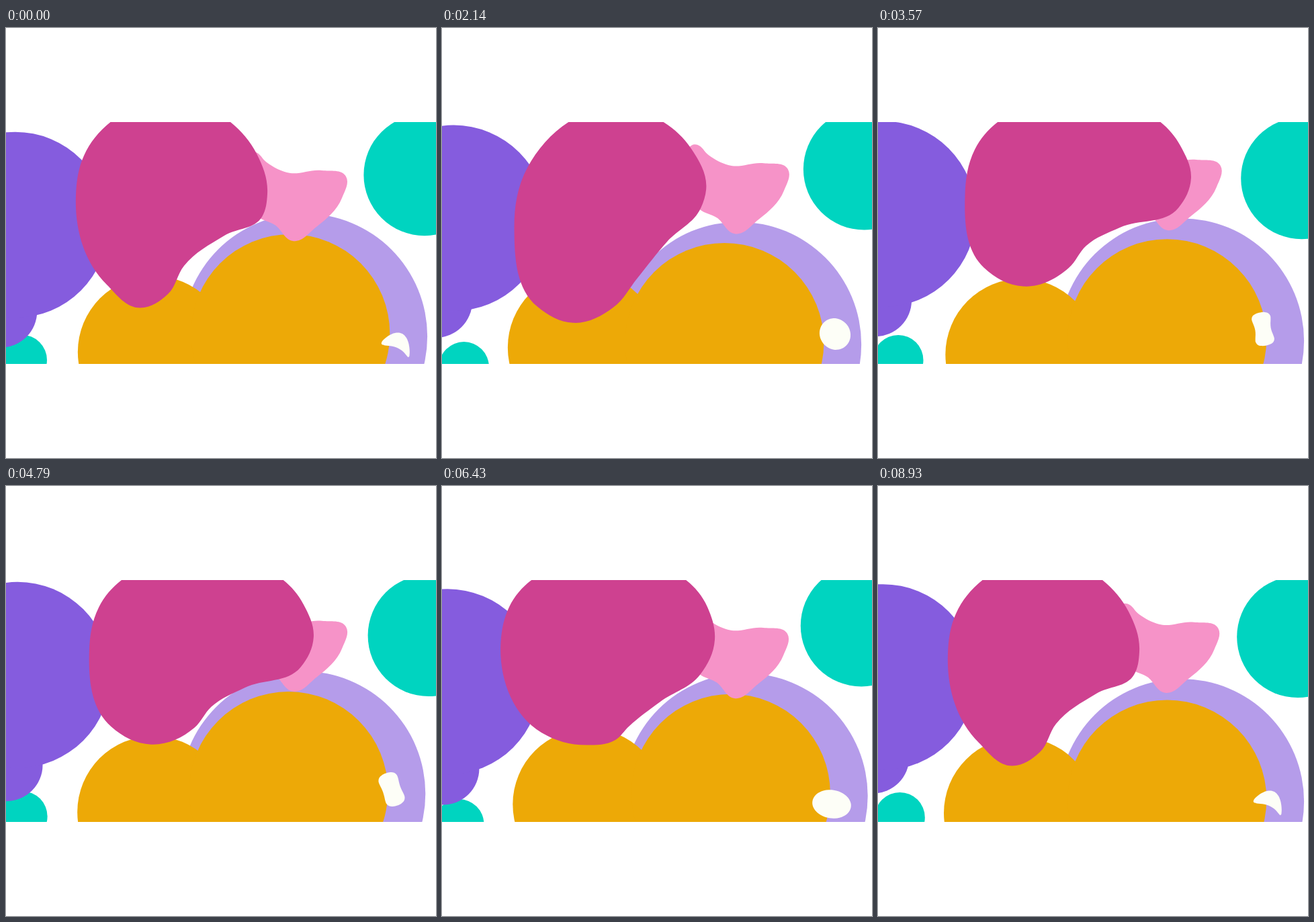
Recreate the animation shown at these times as an HTML page with a canvas. Size 640 by 640 pixels, loop 9000 ms.

```html
<!DOCTYPE html>
<html lang="en">
<head>
<meta charset="utf-8">
<title>Drifting blobs</title>
<style>
  html, body { margin: 0; height: 100%; overflow: hidden; background: #fff; }
  canvas { display: block; width: 100vmin; height: 100vmin; }
</style>
</head>
<body>
<canvas id="stage" width="640" height="640"></canvas>
<script>
const ctx = document.getElementById('stage').getContext('2d');
const LOOP = 9, FPS = 14;
const TEAL = '#00d4c0', PURPLE = '#855cde', VIOLET = '#b59cea', YELLOW = '#eda907';
const PINK = '#f693c8', MAGENTA = '#ce4190', CREAM = '#fdfef7';

// Swings around a middle value; period and the moment of the peak are in seconds.
const wave = (middle, swing, period, peak) =>
  t => middle + swing * Math.cos(2 * Math.PI * (t - peak) / period);

const dots = [
  { color: TEAL, r: 37.3, x: wave(28, 5, 6, 2.5), y: wave(498, 7, 5.2, 7) },
  { color: PURPLE, r: 54, x: wave(-4, 6, 9, 5.8), y: wave(412.5, 9, 6, 0) },
  { color: PURPLE, r: 138.3, x: wave(12.3, 5, 2.7, 4.85), y: wave(285, 8, 7, 7.1) },
  { color: TEAL, r: 90.5, x: wave(626.7, 4, 8, 3.6), y: wave(216.5, 9, 5.2, 4.1) },
  { color: VIOLET, r: 182.5, x: wave(446.6, 5, 2.7, 3.55), y: wave(464, 7, 6, 2.3) },
  { color: YELLOW, r: 113, x: wave(215.5, 5, 6, 5.5), y: wave(480.5, 7, 5.2, 4.1) },
  { color: YELLOW, r: 148, x: wave(425.3, 5, 2.7, 3.55), y: wave(460.5, 7.5, 6, 2.3) }
];

const fish = {
  x: wave(4.5, 4.5, 4.6, 2.3),
  y: wave(-5, 8, 7, 7),
  outline: [[371, 181.5], [388, 197], [418, 212], [470, 209], [506, 218], [500, 250],
    [462, 293], [427, 314], [400, 290], [375, 278], [350, 230]]
};

// Blob outlines run clockwise from the top and share their corner order.
const rest = {
  blob: [[245, 108], [373, 187], [389, 247], [381, 281], [325, 309], [265, 354],
    [241, 396], [200, 416.5], [150, 382], [104, 250], [116, 190]],
  spot: { x: 583, y: 472, rx: 23, ry: 11, angle: 0.5, bend: 14, waist: 0, taper: 0.3 }
};
const tall = {
  blob: [[255, 119], [371, 180], [393, 240], [385, 268], [335, 318], [291, 372],
    [255, 416], [195, 439], [142, 415], [107.5, 300], [127, 208]],
  spot: { x: 585, y: 455.5, rx: 24, ry: 22.5, angle: 0.9, bend: 0, waist: 0, taper: 0 }
};
const wide = {
  blob: [[292, 103], [450, 175], [466, 224], [447, 268], [360, 297], [310, 324],
    [284, 357], [216, 384.5], [158, 357], [129.5, 250], [144, 181]],
  spot: { x: 573, y: 448, rx: 25, ry: 28, angle: 1.4, bend: 0, waist: 0.58, taper: 0 }
};
const squat = {
  blob: [[240, 106], [395, 180], [406, 229], [384, 281], [325, 321], [278, 358],
    [258, 378], [215, 385.5], [148, 367], [87.5, 232], [100, 180]],
  spot: { x: 580, y: 473.5, rx: 29, ry: 21, angle: 0.15, bend: 0, waist: 0, taper: 0 }
};
const morph = [
  { at: 0, pose: rest }, { at: 2.1, pose: tall }, { at: 3.6, pose: wide },
  { at: 4.3, pose: wide }, { at: 6.4, pose: squat }, { at: 7.8, pose: rest }, { at: LOOP, pose: rest }
];

// Blends numbers, and arrays or objects of numbers, part by part.
function mix(a, b, u) {
  if (typeof a === 'number') return a + (b - a) * u;
  if (Array.isArray(a)) return a.map((v, i) => mix(v, b[i], u));
  return Object.fromEntries(Object.keys(a).map(k => [k, mix(a[k], b[k], u)]));
}

function poseAt(t) {
  const next = morph.findIndex(key => key.at > t);
  const from = morph[next - 1], to = morph[next];
  const u = (t - from.at) / (to.at - from.at);
  return mix(from.pose, to.pose, u * u * (3 - 2 * u));
}

// An ellipse that can be bent, pinched at the waist, tapered to one end and turned.
function spotOutline({ x, y, rx, ry, angle, bend, waist, taper }) {
  const cos = Math.cos(angle), sin = Math.sin(angle);
  return Array.from({ length: 24 }, (_, i) => {
    const c = Math.cos(i * Math.PI / 12), s = Math.sin(i * Math.PI / 12);
    const px = rx * c;
    const py = ry * s * (1 - waist * s * s) * (1 - taper * c) + bend * (c * c - 0.5);
    return [x + px * cos - py * sin, y + px * sin + py * cos];
  });
}

// Closed curve; each tangent follows the circle through a point and its neighbours.
function fillSmooth(color, points) {
  const n = points.length;
  const at = i => points[(i + n) % n];
  const length = i => Math.hypot(at(i + 1)[0] - at(i)[0], at(i + 1)[1] - at(i)[1]);
  const tangent = i => {
    const ratio = length(i) / length(i - 1);
    const v = [0, 1].map(k => (at(i)[k] - at(i - 1)[k]) * ratio + (at(i + 1)[k] - at(i)[k]) / ratio);
    const size = Math.hypot(...v) || 1;
    return v.map(c => c / size);
  };
  ctx.fillStyle = color;
  ctx.beginPath();
  ctx.moveTo(...at(0));
  for (let i = 0; i < n; i++) {
    const [x0, y0] = at(i), [x1, y1] = at(i + 1);
    const a = tangent(i), b = tangent(i + 1), h = length(i) * 0.35;
    ctx.bezierCurveTo(x0 + a[0] * h, y0 + a[1] * h, x1 - b[0] * h, y1 - b[1] * h, x1, y1);
  }
  ctx.fill();
}

function fillCircle(color, x, y, r) {
  ctx.fillStyle = color;
  ctx.beginPath();
  ctx.arc(x, y, r, 0, 2 * Math.PI);
  ctx.fill();
}

function draw(seconds) {
  const t = Math.floor((seconds + 0.005) * FPS) % (LOOP * FPS) / FPS;
  ctx.fillStyle = '#fff';
  ctx.fillRect(0, 0, 640, 640);
  ctx.save();
  ctx.beginPath();
  ctx.rect(0, 140, 640, 360);
  ctx.clip();
  for (const { color, r, x, y } of dots) fillCircle(color, x(t), y(t), r);
  fillSmooth(PINK, fish.outline.map(([x, y]) => [x + fish.x(t), y + fish.y(t)]));
  const { blob, spot } = poseAt(t);
  fillSmooth(MAGENTA, blob);
  fillSmooth(CREAM, spotOutline(spot));
  ctx.restore();
}

const start = performance.now();
function tick() {
  draw((performance.now() - start) / 1000);
  requestAnimationFrame(tick);
}
tick();
</script>
</body>
</html>
```
